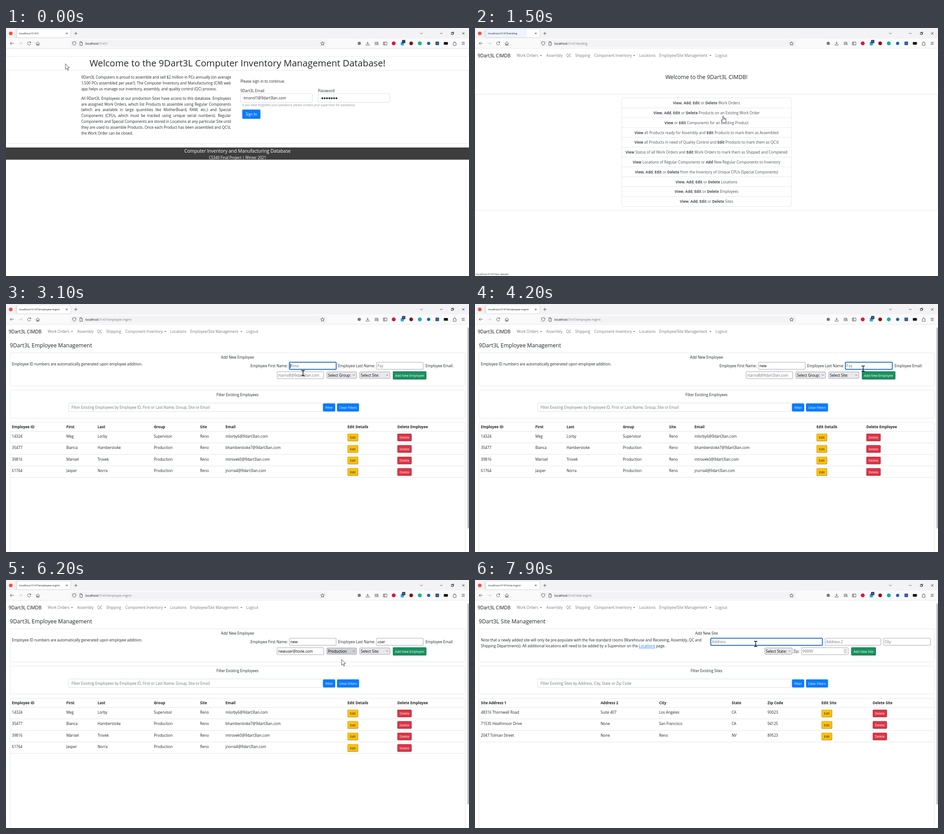
Recreate the animation shown at these times as an HTML page. Size 1021 px wide and 549 px high, loop 8 s.

```html
<!DOCTYPE html>
<html lang="en">
<head>
<meta charset="utf-8">
<title>Inventory database walkthrough</title>
<style>
  html, body { margin: 0; width: 100%; height: 100%; overflow: hidden; background: #fff; }
  svg { display: block; width: 1021px; height: 549px; font-family: "Open Sans", "Noto Sans", sans-serif; }
  .prose { font-size: 8.1px; line-height: 12.8px; color: #212529; }
  .prose div { white-space: nowrap; text-align: justify; text-align-last: justify; }
  .prose div:last-child { text-align-last: left; }
</style>
</head>
<body>
<svg id="stage" viewBox="0 0 1021 549"></svg>
<script>
const LOOP = 8000, STEP = 100;
const BODY = 8.1, SMALL = 7.1, HEAD = 12.1;
const INK = '#212529', GREY = '#757575', LINE = '#dfe1e4', FIELD = '#8f8f9d', BLUE = '#0a7bff';
const BRAND = '9Dart3L', MAIL = '@9dart3lan.com';

// y is the vertical middle of the capitals
const text = (x, y, s, { size = BODY, fill = INK, anchor = 'start', bold = false } = {}) =>
  `<text x="${x}" y="${y + size * .36}" font-size="${size}" fill="${fill}" text-anchor="${anchor}"${bold ? ' font-weight="700"' : ''}>${s}</text>`;
const centred = (x, y, s, opts) => text(x, y, s, { ...opts, anchor: 'middle' });
const rect = (x, y, w, h, fill, stroke = 'none', r = 0, sw = .8) =>
  `<rect x="${x}" y="${y}" width="${w}" height="${h}" rx="${r}" fill="${fill}" stroke="${stroke}" stroke-width="${sw}"/>`;
const circle = (x, y, r, fill) => `<circle cx="${x}" cy="${y}" r="${r}" fill="${fill}"/>`;
const path = (d, stroke = '#4a4a52', fill = 'none', sw = .9) =>
  `<path d="${d}" stroke="${stroke}" fill="${fill}" stroke-width="${sw}"/>`;
const card = (y, h, x = 9, w = 1003.5) => rect(x, y, w, h, 'none', LINE, 2);
const chevron = (x, y, r = 2) => path(`M${x - r} ${y - r / 2}l${r} ${r}l${r} ${-r}`);

const blueButton = (x, y, w, h, s, size) =>
  rect(x, y, w, h, BLUE, 'none', 2) + centred(x + w / 2, y + h / 2 + .3, s, { fill: '#fff', size });
const bevelButton = (x, y, w, h, s, fill, edge, ink = '#fff') =>
  rect(x, y, w, h, edge, 'none', 2) + rect(x + .3, y + .3, w - 1, h - 1.1, fill, 'none', 1.7) +
  centred(x + w / 2, y + h / 2 + .2, s, { fill: ink, size: SMALL });

function input(x, y, w, value, hint, focused, t) {
  const ring = focused
    ? rect(x - 1, y - 1, w + 2, 17.5, 'none', '#a9cdf5', 2.5, 1.2) + rect(x, y, w, 15.5, '#fff', '#0a58b8', 1.5, 1.5)
    : rect(x, y, w, 15.5, '#fff', FIELD, 1.2);
  const caret = focused && !value && Math.floor(t / 450) % 2 === 0 ? path(`M${x + 2.2} ${y + 3}v10`, '#000') : '';
  return ring + text(x + 2.3, y + 8, value || hint, { fill: value ? '#000' : GREY }) + caret;
}
const select = (x, w, s, active) =>
  rect(x, 150.3, w, 14.2, active ? '#d0d0d7' : '#e9e9ed', FIELD, 1.5) +
  text(x + 2.6, 157.6, s, { fill: '#000' }) + chevron(x + w - 6, 157.3);

const typed = (s, t, start, perChar = 100) =>
  s.slice(0, Math.max(0, Math.floor((t - start) / perChar) + 1));

/* ---------- browser window ---------- */
function chrome(route, badge, loading) {
  const arrow = (x, d, c) => path(`M${x + 4 * d} 34h${-8 * d}m${3.3 * d} -3.3l${-3.3 * d} 3.3l${3.3 * d} 3.3`, c);
  return rect(0, 0, 1021, 23, '#f3f3f5') + rect(0, 23, 1021, 22, '#fafafb') + path('M0 45h1021', '#e6e6e8') +
    circle(10.5, 12, 4, '#f0523c') + path('M22 4v17', '#d5d5da') +
    rect(24, 2, 119, 19.5, '#fff', '#cfcfd6', 2) + (loading ? rect(24.5, 2.5, 90, 18.5, '#eef4fd') : '') +
    text(29, 12, 'localhost:5147/' + route, { size: 6.07, fill: '#15141a' }) +
    path('M132 10l4 4m0 -4l-4 4') + path('M150.5 12h7m-3.5 -3.5v7') + chevron(916, 12, 3) +
    path('M957 12h5.5') + path('M982 10.5h4v4h-4zM983.2 10.5v-1.3h4v4h-1.2', '#222') + path('M1006 9.5l5 5m0 -5l-5 5', '#222') +
    arrow(13, 1) + arrow(32, -1, '#c4c4ca') +
    path('M54 32a3.6 3.6 0 1 0 .6 3M54.6 30v2.6h-2.6') + path('M66 34.3l4 -3.8l4 3.8M67 33.6v4.4h6v-4.4M69.2 38v-2.6h1.6v2.6') +
    rect(143, 26.5, 565, 15.5, '#f3f3f5', 'none', 2) +
    path('M150.5 30l3.7 1.3c0 4 -1 5.7 -3.7 7c-2.7 -1.3 -3.7 -3 -3.7 -7z') + path('M163 30.3h3.3l2 2v6h-5.3zM166 30.3v2.3h2.3') +
    text(175, 34.3, `localhost<tspan fill="#7b7b82">:5147/${route}</tspan>`, { size: 6.9, fill: '#15141a' }) +
    path('M698 30l1.2 2.7l3 .3l-2.2 2l.6 3l-2.6 -1.5l-2.6 1.5l.6 -3l-2.2 -2l3 -.3z') +
    circle(779, 34, 3.6, '#77777e') + path('M797.5 30v5.5m-2.5 -2.5l2.5 2.5l2.5 -2.5M794 36v2h7v-2') +
    path('M814 30.5v7.5m2.3 -7.5v7.5m2.3 -7.5v7.5m1 -7l1.7 7') + path('M832 31h8v6.5h-8zM835 31v6.5m-2 -4.5h1m-1 2h1') +
    circle(855, 34, 4.3, '#e0183c') + rect(870.5, 31, 7, 7.5, '#2aa7df', 'none', 1) +
    rect(873.5, 26.5, 7, 7, '#24245c', 'none', 1) + centred(877, 30, badge, { size: 5.5, fill: '#fff' }) +
    circle(893.5, 34, 4, '#8b1018') + circle(912.5, 34, 4.3, '#11b3a5') + circle(932, 34, 3.6, '#1c5fb4') +
    rect(947, 30, 8, 8, '#3d5f94', 'none', 1) + rect(965.5, 31, 9, 6, '#17171a', 'none', 1) +
    path('M986 33h2v-1.5a1.3 1.3 0 0 1 2.6 0v1.5h2v5.3h-6.6v-1.8a1.2 1.2 0 0 0 0 -2.2z') +
    path('M1005 31.5h6.5m-6.5 2.5h6.5m-6.5 2.5h6.5');
}
const status = route => rect(0, 540, 78, 9, '#fbfbfc') +
  text(2, 544.5, 'localhost:5147/' + route, { size: 6.07, fill: '#3a3a40' });

function nav() {
  const links = [[92, 'Work Orders'], [157, 'Assembly'], [201, 'QC'], [221, 'Shipping'], [263, 'Component Inventory'],
    [362, 'Locations'], [406, 'Employee/Site Management'], [530, 'Logout']];
  return text(6, 61, BRAND + ' CIMDB', { size: 10.1, fill: '#111' }) +
    links.map(([x, s]) => text(x, 61, s, { fill: '#787878' })).join('') +
    [145.5, 351, 519].map(x => path(`M${x - 2.1} 60h4.2l-2.1 2.2z`, 'none', '#666')).join('');
}

/* ---------- pages ---------- */
function prose(y, lines) {
  return `<foreignObject x="166" y="${y}" width="330" height="${lines.length * 12.8 + 2}">
    <div xmlns="http://www.w3.org/1999/xhtml" class="prose">${lines.map(l => `<div>${l}</div>`).join('')}</div></foreignObject>`;
}
function login() {
  return card(45.5, 17.5, .4, 1020) + centred(510.5, 77.5, `Welcome to the ${BRAND} Computer Inventory Management Database!`, { size: 20.2 }) +
    card(93.5, 162, .4, 1020) +
    prose(103, [`${BRAND} Computers is proud to assemble and sell $2 million in PCs annually (on average`,
      '1,500 PCs assembled per year!). The Computer Inventory and Manufacturing (CIM) web',
      'app helps us manage our inventory, assembly, and quality control (QC) process.']) +
    prose(149.8, [`All ${BRAND} Employees at our production Sites have access to this database. Employees`,
      'are assigned Work Orders, which list Products to assemble using Regular Components',
      '(which are available in large quantities like MotherBoard, RAM, etc.) and Special',
      'Components (CPUs, which must be tracked using unique serial numbers). Regular',
      'Components and Special Components are stored in Locations at any particular Site until',
      "they are used to assemble Products. Once each Product has been assembled and QC'd,",
      'the Work Order can be closed.']) +
    text(517, 118, 'Please sign in to continue.') + text(517, 139, BRAND + ' Email') + text(688, 139, 'Password') +
    [517, 688].map(x => rect(x, 145, 158.5, 19.5, '#fff', '#ced4da', 2)).join('') +
    text(524, 155, 'tmorvil1' + MAIL) +
    Array.from({ length: 7 }, (_, i) => circle(697.5 + i * 5.2, 155.5, 2, INK)).join('') +
    text(521, 171, 'If you have forgotten your password, please contact your supervisor for assistance.', { size: 6.48, fill: '#868e96' }) +
    blueButton(521, 180.5, 40, 20.5, 'Sign In', BODY) +
    rect(0, 264.5, 1021, 27, '#3d3d3d') +
    centred(510.5, 272, 'Computer Inventory and Manufacturing Database', { size: 10.1, fill: '#fff' }) +
    centred(510.5, 287, 'CS340 Final Project | Winter 2021', { fill: '#fff' });
}

const CRUD = '*View*, *Add*, *Edit* or *Delete* ';
const TASKS = [
  ['work-orders', CRUD + 'Work Orders'],
  ['wo-details', CRUD + 'Products on an Existing Work Order'],
  ['product-details', '*View* or *Edit* Components for an Existing Product'],
  ['assembly', '*View* all Products ready for Assembly and *Edit* Products to mark them as Assembled'],
  ['qc', "*View* all Products in need of Quality Control and *Edit* Products to mark them as QC'd"],
  ['shipping', '*View* Status of all Work Orders and *Edit* Work Orders to mark them as Shipped and Completed'],
  ['regular-comps', '*View* Locations of Regular Components or *Add* New Regular Components to Inventory'],
  ['special-comps', CRUD + 'from the Inventory of Unique CPUs (Special Components)'],
  ['locations', CRUD + 'Locations'],
  ['employee-mgmt', CRUD + 'Employees'],
  ['site-mgmt', CRUD + 'Sites'],
];
const ROW = 21.8;
function landing(t, pointer) {
  const rows = TASKS.map(([, label], i) =>
    (i ? path(`M323.5 ${155 + i * ROW}h374`, LINE, 'none', .8) : '') +
    centred(510.5, 166.3 + i * ROW, label.replace(/\*(.+?)\*/g, '<tspan font-weight="700">$1</tspan>'), { fill: '#495057' }));
  const hovered = TASKS[Math.floor((pointer.y - 155) / ROW)];
  return nav() + centred(510.5, 109, `Welcome to the ${BRAND} CIMDB!`, { size: HEAD }) +
    card(146.5, 257.5, .4, 1020) + card(154.5, 240.5, 323.5, 374) + rows.join('') + (hovered ? status(hovered[0]) : '');
}

// Shared frame of the two management pages
function management(kind, filterHint, columns, heads, records) {
  const [editX, deleteX] = columns.slice(-2);
  const rows = records.map((rec, i) => {
    const y = 293 + i * 25.5;
    return rec.map((s, c) => text(columns[c], y, s)).join('') + path(`M9 ${y + 14.5}h1003.5`, LINE) +
      bevelButton(editX, y - 6, 23.5, 16.7, 'Edit', '#ffc107', '#8a6a10', INK) +
      bevelButton(deleteX, y - 6, 31.5, 16.7, 'Delete', '#dc3545', '#861c28');
  });
  return nav() + text(8.5, 92, `${BRAND} ${kind} Management`, { size: HEAD }) +
    card(108, 73.5) + centred(510.5, 118, 'Add New ' + kind) +
    card(190.5, 62) + centred(510.5, 201, `Filter Existing ${kind}s`) +
    rect(138, 219, 559, 19, '#fff', '#ced4da', 2) + text(144.5, 229, filterHint, { fill: '#6c757d' }) +
    blueButton(699, 220, 27, 18, 'Filter', SMALL) + blueButton(730, 220, 48.5, 18, 'Clear Filters', SMALL) +
    card(262, 300) + heads.map((s, c) => text(columns[c], 272.5, s, { bold: true })).join('') +
    path('M9 282h1003.5', LINE) + rows.join('');
}
const scrollbar = () => rect(1018.3, 52, 1.6, 445, '#85858c', 'none', .8);
const addButton = (x, w, kind) => bevelButton(x, 149, w, 18, 'Add New ' + kind, '#1b9160', '#0e4f33');

const STAFF = [
  ['14324', 'Meg', 'Lorby', 'Supervisor', 'Reno', 'mlorby6' + MAIL],
  ['35477', 'Bianca', 'Hamberstoke', 'Production', 'Reno', 'bhamberstoke7' + MAIL],
  ['39816', 'Marisel', 'Trovek', 'Production', 'Reno', 'mtrovek0' + MAIL],
  ['61764', 'Jasper', 'Norra', 'Production', 'Reno', 'jnorra4' + MAIL],
];
const NEW_MAIL = 'newuser@tovle.com';
function employees(t) {
  const added = t >= 6600;
  const fill = (s, start, per) => added ? '' : typed(s, t, start, per);
  const during = (from, to) => t >= from && t < to;
  const group = added || t < 6000 ? 'Select Group:' : t < 6300 ? 'Production' : 'Supervisor';
  const site = added || t < 6400 ? 'Select Site:' : 'San Francisco';
  const menu = t < 6900 ? '' : rect(402.5, 71, 114.5, 43, '#fff', '#d2d2d2', 2) +
    text(411, 85, 'Manage Employee Details') + text(411, 102, 'Manage Site Details') +
    (t >= 7000 ? status(t < 7200 ? 'employee-mgmt' : 'site-mgmt') : '');
  return management('Employee', 'Filter Existing Employees by Employee ID, First or Last Name, Group, Site or Email',
      added ? [13, 126, 190, 307, 403, 516, 769, 872] : [13, 133, 202, 326, 428, 484, 753, 863],
      ['Employee ID', 'First', 'Last', 'Group', 'Site', 'Email', 'Edit Details', 'Delete Employee'],
      added ? [...STAFF, ['61765', 'new', 'user', 'Supervisor', 'San Francisco', NEW_MAIL]] : STAFF) +
    text(13, 133.5, 'Employee ID numbers are automatically generated upon employee addition.') +
    text(539, 137.5, 'Employee First Name:') + input(625, 129, 103, fill('new', 3500), 'Rosa', during(3000, 4100), t) +
    text(732.5, 137.5, 'Employee Last Name:') + input(817, 129, 103, fill('user', 4400), 'Fay', during(4100, 4800), t) +
    text(925, 137.5, 'Employee Email:') + input(598, 149.8, 102.5, fill(NEW_MAIL, 4900, 35), 'rtarno8' + MAIL, during(4800, 5700), t) +
    select(707.5, 65.5, group, during(5700, 6400)) + select(780, 66.5, site, during(6400, 6500)) +
    addButton(853, 74, 'Employee') + menu +
    (during(4800, 5500) ? '' : scrollbar()); // fades while the mouse rests during typing
}
function sites(t) {
  return management('Site', 'Filter Existing Sites by Address, City, State or Zip Code', [13, 277, 406, 566, 645, 764, 877],
      ['Site Address 1', 'Address 2', 'City', 'State', 'Zip Code', 'Edit Site', 'Delete Site'],
      [['48316 Thornwell Road', 'Suite 407', 'Los Angeles', 'CA', '90023'],
       ['71535 Heathmoor Drive', 'None', 'San Francisco', 'CA', '94125'],
       ['2047 Tolman Street', 'None', 'Reno', 'NV', '89523']]) +
    text(13, 133.5, 'Note that a newly added site will only be pre-populate with the five standard rooms (Warehouse and Receiving, Assembly, QC and') +
    text(13, 146.5, `Shipping Departments). All additional locations will need to be added by a Supervisor on the <tspan fill="${BLUE}" text-decoration="underline">Locations</tspan> page.`) +
    input(520, 129, 246, '', 'Address', t >= 7700, t) + input(772, 129, 123, '', 'Address 2') + input(901, 129, 103.5, '', 'City') +
    select(639, 60.5, 'Select State:') + text(702, 157.6, 'Zip:') + input(720, 149.8, 103, '', '99999') +
    rect(812.5, 152, 8, 11, '#e9e9ed') + path('M815 156l1.6 -1.6l1.6 1.6m-3.2 3l1.6 1.6l1.6 -1.6', '#666', 'none', .7) +
    addButton(829.5, 54.5, 'Site') + scrollbar();
}

/* ---------- pointer: time, x, y, shape ---------- */
const MOVES = [
  [0, 131, 79, 'arrow'], [200, 131, 79, 'arrow'], [600, 781, 378, 'arrow'], [700, 781, 378, 'arrow'],
  [1200, 541, 190, 'hand'], [1400, 541, 190, 'hand'], [1500, 547.5, 194.5, 'hand'], [1600, 547.5, 194.5, 'hand'],
  [2500, 541, 360, 'hand'], [2700, 541, 360, 'arrow'], [3000, 655, 153, 'beam'], [3600, 655, 153, 'beam'],
  [4000, 856, 143, 'beam'], [5400, 856, 143, 'beam'], [5700, 740, 158, 'arrow'], [6000, 740, 158, 'arrow'],
  [6200, 740, 176, 'arrow'], [6300, 740, 182, 'arrow'], [6400, 812, 170, 'arrow'], [6500, 885, 160, 'hand'],
  [6600, 885, 160, 'arrow'], [6700, 667, 320, 'arrow'], [6900, 470, 62, 'hand'], [7000, 474, 86, 'hand'],
  [7200, 475.5, 103, 'hand'], [7400, 475.5, 103, 'arrow'], [7700, 619, 141.5, 'beam'], [LOOP, 619, 141.5, 'beam'],
];
function pointerAt(t) {
  const i = MOVES.findIndex(m => m[0] > t);
  const [t0, x0, y0, from] = MOVES[i - 1], [t1, x1, y1, to] = MOVES[i];
  const p = (t - t0) / (t1 - t0), e = p * p * (3 - 2 * p);
  return { x: x0 + (x1 - x0) * e, y: y0 + (y1 - y0) * e, shape: p === 0 || from === to ? from : 'arrow' };
}
const SHAPES = {
  arrow: path('M0 0v12.5l2.9 -2.7l2 4.7l2 -.9l-2 -4.5h4z', '#222', '#fff', .8),
  hand: path('M-1.3 1a1.2 1.2 0 0 1 2.4 0v4.2l4 .8q1.3 .4 1.2 1.8l-.6 4.7l-1 2.8h-5.7l-3.5 -5.3q-.6 -1.5 1 -1.5l2.2 1.6zM1.1 5v3m2 -2.6v2.6m1.9 -2v2', '#222', '#fff', .8),
  beam: path('M-3.5 -6q2.5 0 3.5 1q1 -1 3.5 -1M0 -5v10M-3.5 6q2.5 0 3.5 -1q1 1 3.5 1', '#000', 'none', 1.3),
};

/* ---------- playback ---------- */
const PAGES = [
  { from: 0, route: '', render: login },
  { from: 1400, route: 'landing', render: landing },
  { from: 2700, route: 'employee-mgmt', render: employees },
  { from: 7400, route: 'site-mgmt', render: sites },
];
function draw(t) {
  const pointer = pointerAt(t);
  const page = PAGES.findLast(p => t >= p.from);
  const badge = t < 1400 ? 1 : t < 1800 ? 0 : 4;
  const loading = page.from > 0 && t < page.from + 300;
  return page.render(t, pointer) + chrome(page.route, badge, loading) +
    `<g transform="translate(${pointer.x} ${pointer.y})">${SHAPES[pointer.shape]}</g>`;
}

const stage = document.getElementById('stage');
let shown = -1;
function tick() {
  const t = Math.floor(performance.now() % LOOP / STEP) * STEP;
  if (t !== shown) stage.innerHTML = draw(shown = t);
  requestAnimationFrame(tick);
}
tick();
</script>
</body>
</html>
```
